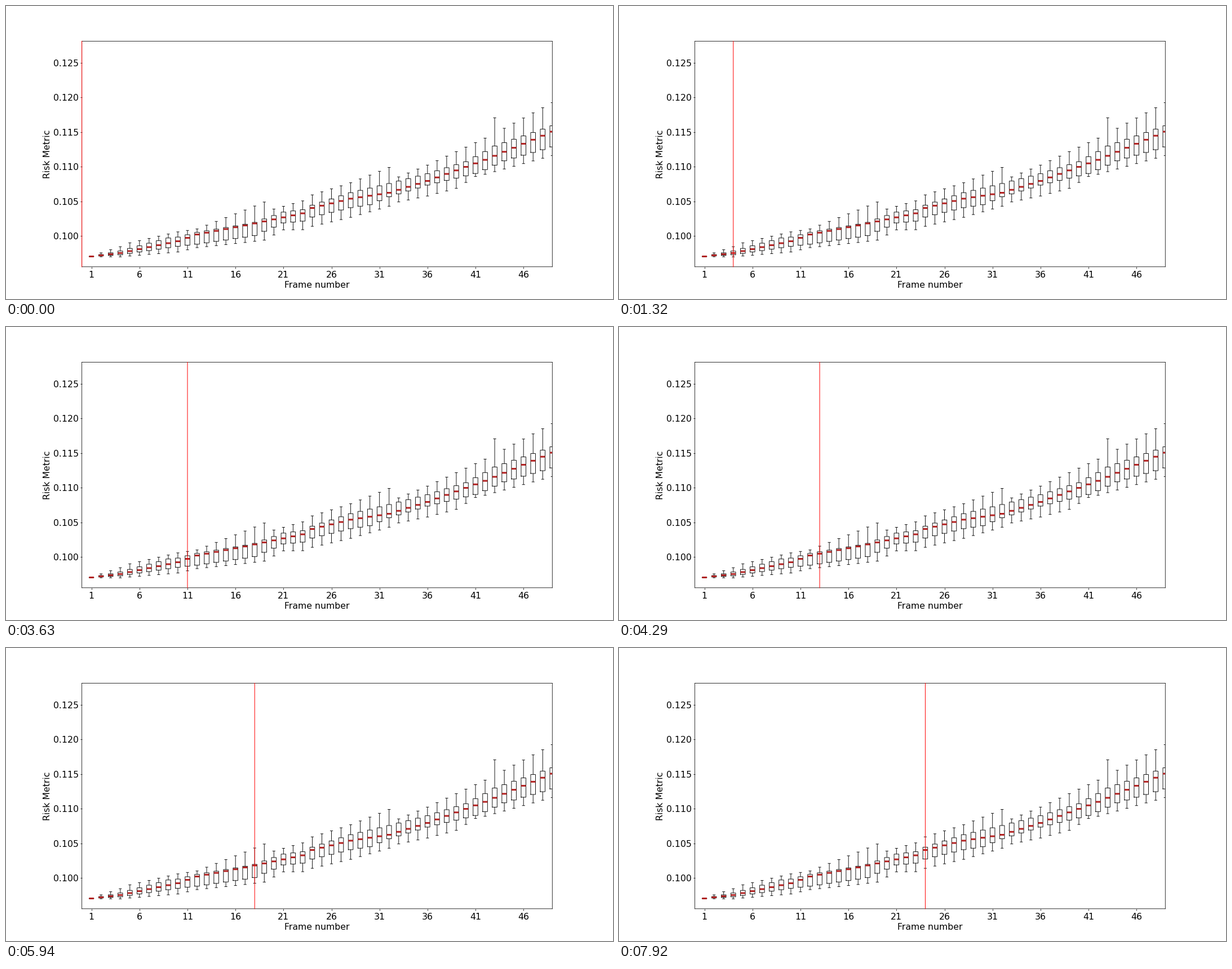
These frames come from a looping animation (1077x520 px, 8 s). A matplotlib script:

```python
import matplotlib.pyplot as plt
import numpy as np
from matplotlib.animation import FuncAnimation
from matplotlib.collections import LineCollection

WIDTH, HEIGHT, DPI = 1077, 520, 72
LOOP_MS, TICK_MS, STEP_MS = 8000, 40, 330
COUNT = 49
UNIT = 1e-4

plt.rcParams.update({"font.family": "DejaVu Sans", "font.size": 15.7,
                     "path.snap": False})

numbers = np.arange(1, COUNT + 1)


def trend(*points):
    """Straight segments through (box number, value) points, in UNITs."""
    x, y = zip(*points)
    return UNIT * np.interp(numbers, x, y)


# The median climbs; quartiles and whiskers are distances from it.
median = trend((1, 970.3), (4, 975.2), (10, 992.3), (12, 1002), (17, 1015.1),
               (23, 1032.6), (24, 1040.3), (28, 1053.8), (32, 1062.3),
               (36, 1079.4), (42, 1109.9), (49, 1150.6))
q1 = median - trend((1, 0.2), (10, 7.3), (12, 14), (18, 17.5), (21, 8),
                    (24, 13), (30, 13), (32, 5.7), (36, 6), (41, 14.6),
                    (44, 13), (49, 22))
q3 = median + trend((1, 0.2), (9, 7.5), (12, 3), (18, 1.5), (21, 7.6),
                    (24, 4), (32, 13.4), (40, 7.5), (43, 14.2), (49, 8.5))
low = median - trend((1, 0.4), (12, 19), (19, 27), (21, 18), (24, 26.5),
                     (28, 27), (33, 17.5), (39, 26), (41, 19), (49, 34.5))
high = median + trend((1, 0.8), (5, 12), (10, 13.5), (12, 8), (19, 28),
                      (20, 15), (28, 23), (32, 36.6), (33, 18.7), (42, 31.4),
                      (43, 55), (44, 34), (49, 42))

fig = plt.figure(figsize=(WIDTH / DPI, HEIGHT / DPI), dpi=DPI, facecolor="white")
ax = fig.add_axes([0.125, 0.11, 0.775, 0.77])


def strokes(paths, color="black", lw=0.9, zorder=2, cap="projecting"):
    lines = LineCollection(paths, colors=color, linewidths=lw, zorder=zorder,
                           capstyle=cap, joinstyle="miter")
    ax.add_collection(lines, autolim=False)


def bars(levels, half, **style):
    strokes([[(x - half, y), (x + half, y)] for x, y in zip(numbers, levels)],
            **style)


def stems(starts, ends):
    strokes([[(x, a), (x, b)] for x, a, b in zip(numbers, starts, ends)],
            cap="butt")


def boxes(bottoms, tops, half):
    strokes([[(x - half, a), (x + half, a), (x + half, b), (x - half, b),
              (x - half, a)] for x, a, b in zip(numbers, bottoms, tops)])


boxes(q1, q3, 0.25)
stems(low, q1)
stems(q3, high)
bars(low, 0.125)
bars(high, 0.125)
bars(median, 0.25, color="firebrick", lw=3, zorder=3, cap="butt")

ax.set_xlim(0, COUNT)
ax.set_ylim(0.095537, 0.128143)
ax.set_xticks(range(1, COUNT, 5))
ax.set_yticks(np.arange(0.100, 0.126, 0.005))
ax.yaxis.set_major_formatter("{x:.3f}")
ax.tick_params(length=2.8, width=0.8, pad=2.8)
ax.tick_params(axis="x", pad=4)
ax.set_xlabel("Frame number", labelpad=3)
ax.set_ylabel("Risk Metric", labelpad=3)
for spine in ax.spines.values():
    spine.set_linewidth(0.8)

cursor = ax.axvline(0, color="red", lw=1, zorder=5, clip_on=False)


def update(frame):
    # Rounded so that a step never starts later than its due time.
    step = (frame * TICK_MS + 30) // STEP_MS
    cursor.set_xdata([step, step])
    return (cursor,)


anim = FuncAnimation(fig, update, frames=LOOP_MS // TICK_MS, interval=TICK_MS,
                     repeat=True, repeat_delay=0, blit=False)
plt.show()
```
